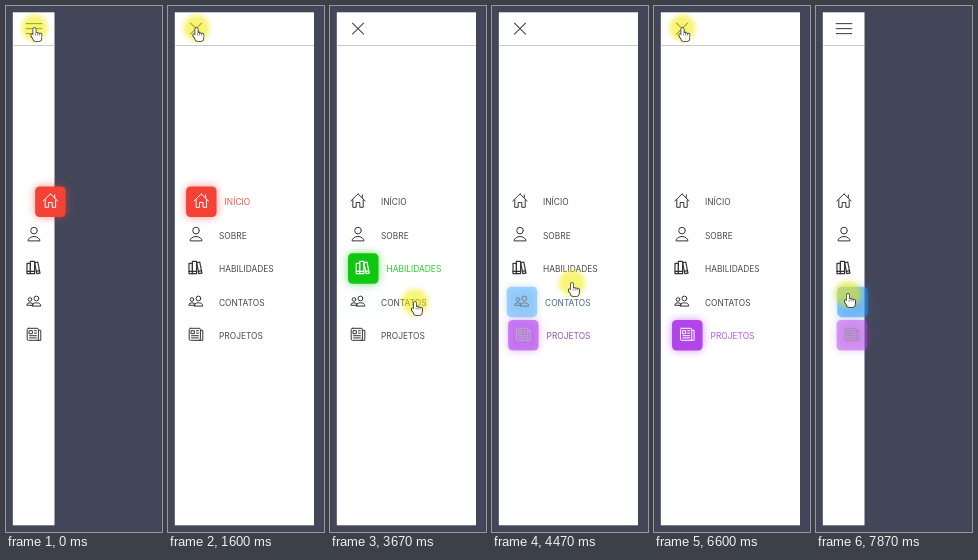
Write an HTML page with a canvas that moves like this. It is 156x526 px and loops after 8 s.

```html
<!DOCTYPE html>
<html lang="pt">
<head>
<meta charset="utf-8">
<title>Menu lateral</title>
<style>
  html, body { margin: 0; width: 100%; height: 100%; overflow: hidden; background: #434559; }
  canvas { display: block; width: 156px; height: 526px; }
</style>
</head>
<body>
<canvas id="stage"></canvas>
<script>
const W = 156, H = 526, LOOP = 8000, STEP = 1000 / 15, TRANSITION = 500;
const canvas = document.getElementById('stage');
const ctx = canvas.getContext('2d');
const scale = window.devicePixelRatio || 1;
canvas.width = W * scale;
canvas.height = H * scale;

const OPEN_AT = 860, CLOSE_AT = 6650;
const BOX = 30.5;
const INK = [52, 52, 56], WHITE = [255, 255, 255];

const items = [
  { label: 'INÍCIO', color: [244, 67, 54], icon: home },
  { label: 'SOBRE', color: [255, 161, 23], icon: person },
  { label: 'HABILIDADES', color: [15, 199, 15], icon: books },
  { label: 'CONTATOS', color: [33, 150, 243], icon: people },
  { label: 'PROJETOS', color: [177, 69, 233], icon: newspaper }
];

const rowY = i => 195.7 + 33.4 * i;
const clickTime = i => 2405 + 626 * (i - 1);

// Each item is clicked in turn, then one more click after the menu has closed.
const clicks = items.map((_, item) => ({ item, time: item ? clickTime(item) : -TRANSITION }));
clicks.push({ item: 3, time: 7715 });

const menuButton = { x: 28.5, y: 22 };
const glide = (start, duration, x, y) => ({ start, duration, x, y });
const glides = [
  glide(1700, 660, 81, rowY(1)),
  ...[2, 3, 4].map(i => glide(clickTime(i - 1), 300, 85, rowY(i))),
  glide(clickTime(4), 180, 80, 277),
  glide(4700, 700, 81.5, 297),
  glide(5870, 480, menuButton.x, menuButton.y),
  glide(CLOSE_AT, 400, 86, 173),
  glide(7070, 270, 106, 222),
  glide(7340, 300, 32, 288)
];

const mix = (a, b, k) => a + (b - a) * k;
const mixColor = (a, b, k) => a.map((v, i) => mix(v, b[i], k));
const rgba = (c, alpha = 1) => `rgba(${c.map(Math.round).join()},${alpha})`;
const clamp = v => Math.min(1, Math.max(0, v));
const smooth = k => k * k * (3 - 2 * k);

// The CSS "ease" curve, solved by bisection.
function ease(x) {
  x = clamp(x);
  const bezier = (a, b, s) => 3 * a * s * (1 - s) ** 2 + 3 * b * s * s * (1 - s) + s ** 3;
  let lo = 0, hi = 1;
  for (let i = 0; i < 20; i++) {
    const mid = (lo + hi) / 2;
    if (bezier(.25, .25, mid) < x) lo = mid; else hi = mid;
  }
  return bezier(.1, 1, lo);
}

const since = (start, t) => ease((t - start) / TRANSITION);
const openness = t => since(OPEN_AT, t) - since(CLOSE_AT, t);

function activity(index, t) {
  const last = clicks.findLastIndex(c => c.time <= t);
  const k = since(clicks[last].time, t);
  if (clicks[last].item === index) return k;
  return clicks[last - 1]?.item === index ? 1 - k : 0;
}

function pointerAt(t) {
  return glides.reduce((p, g) => {
    const k = smooth(clamp((t - g.start) / g.duration));
    return { x: mix(p.x, g.x, k), y: mix(p.y, g.y, k) };
  }, menuButton);
}

function line(...points) {
  ctx.beginPath();
  for (let i = 0; i < points.length; i += 2) ctx.lineTo(points[i], points[i + 1]);
  ctx.stroke();
}

function roundBox(x, y, w, h, r) {
  ctx.beginPath();
  ctx.roundRect(x, y, w, h, r);
}

function at(x, y, turn, drawPart) {
  ctx.save();
  ctx.translate(x, y);
  ctx.rotate(turn);
  drawPart();
  ctx.restore();
}

// Head and shoulders; r is the head radius.
function bust(r) {
  ctx.beginPath();
  ctx.arc(0, -r, r, 0, Math.PI * 2);
  ctx.stroke();
  ctx.beginPath();
  ctx.ellipse(0, 2 * r, 1.8 * r, 1.2 * r, 0, Math.PI, 0);
  ctx.closePath();
  ctx.stroke();
}

function home() {
  for (const side of [-1, 1]) {
    line(0, -6.8, side * 7.2, .3);
    line(side * 5.2, -1, side * 5.2, 6.6, side * 1.8, 6.6, side * 1.8, 1.8, 0, 1.8);
  }
  line(4.3, -3, 4.3, -5.8);
}

function person() {
  at(0, -.2, 0, () => bust(3.3));
}

function books() {
  const book = (x, w, h) => {
    ctx.strokeRect(x, 6.2 - h, w, h);
    line(x, 3.8, x + w, 3.8);
  };
  ctx.lineWidth = 1.2;
  book(-7, 3.4, 10.4);
  book(-3.6, 4.2, 12.4);
  at(2.2, 0, -.2, () => book(-.6, 3.2, 11.2));
}

function people() {
  at(2.4, 0, 0, () => bust(2.4));
  at(-4, .4, 0, () => bust(1.8));
}

function newspaper() {
  roundBox(-6.8, -6, 11.2, 12, 1.2);
  ctx.stroke();
  line(4.4, -4, 6.8, -4, 6.8, 6, 3.4, 6);
  ctx.strokeRect(-4.6, -3.6, 3, 3);
  for (const y of [-3.6, -1.2, 1.4, 3.6]) line(y < 0 ? .2 : -4.6, y, 2.4, y);
}

function drawToggle(open) {
  ctx.strokeStyle = '#4a4a4e';
  ctx.lineWidth = 1.1;
  for (const side of [-1, 0, 1]) {
    at(28, 22.6 + side * 5 * (1 - open), -side * open * Math.PI / 4, () => {
      ctx.globalAlpha = side ? 1 : 1 - open;
      line(-8.2, 0, 8.2, 0);
    });
  }
}

function drawItem(item, index, t, open, width) {
  const active = activity(index, t);
  const y = rowY(index);
  const centre = 28 + active * mix(16.4, 5.3, open);

  if (active > 0) {
    ctx.save();
    ctx.globalAlpha = active;
    ctx.fillStyle = rgba(item.color);
    ctx.shadowColor = rgba(item.color, .6);
    ctx.shadowBlur = 9 * scale;
    roundBox(centre - BOX / 2, y - BOX / 2, BOX, BOX, 4.5);
    ctx.fill();
    ctx.restore();
  }

  at(centre, y - 1, 0, () => {
    ctx.strokeStyle = rgba(mixColor(INK, WHITE, active));
    ctx.lineWidth = 1;
    ctx.lineJoin = ctx.lineCap = 'round';
    item.icon();
  });

  ctx.save();
  ctx.beginPath();
  ctx.rect(7, 6, width, 513);
  ctx.clip();
  ctx.globalAlpha = open * .9;
  ctx.fillStyle = rgba(mixColor(INK, item.color, active));
  ctx.font = '400 8.4px Inter, sans-serif';
  ctx.fillText(item.label, 51 + 5.6 * active, y + 3.6);
  ctx.restore();
}

// Stroking every part before filling leaves one joined outline.
function hand() {
  const parts = [() => roundBox(-1.2, 6, 8, 7, 2.5), () => roundBox(-1.2, 0, 2.4, 9, 1.2)];
  for (let i = 1; i < 4; i++) parts.push(() => roundBox(2 * i - 1, 4.4 + i * .4, 2, 4, 1));
  parts.push(() => {
    ctx.beginPath();
    ctx.ellipse(-1.4, 8.6, 1.2, 2.8, -.6, 0, Math.PI * 2);
  });
  for (const paint of ['stroke', 'fill']) {
    for (const part of parts) {
      part();
      ctx[paint]();
    }
  }
  ctx.lineWidth = .5;
  for (let i = 0; i < 3; i++) line(1.1 + 2 * i, 5.5, 1.1 + 2 * i, 7.6);
}

function arrow() {
  const shape = new Path2D('M0 0V9L2 7.2L3.6 10.4L5 9.8L3.6 6.6H6.4Z');
  ctx.stroke(shape);
  ctx.fill(shape);
}

function drawPointer(t, width) {
  const { x, y } = pointerAt(t);
  const glow = ctx.createRadialGradient(x, y, 0, x, y, 16.5);
  glow.addColorStop(0, 'rgba(242,236,8,.6)');
  glow.addColorStop(.6, 'rgba(242,236,8,.52)');
  glow.addColorStop(1, 'rgba(242,236,8,0)');
  ctx.fillStyle = glow;
  ctx.fillRect(x - 17, y - 17, 34, 34);

  const clickable = x < 7 + width && (y < 40 || y > rowY(0) - BOX / 2);
  at(x, y, 0, () => {
    ctx.fillStyle = '#fff';
    ctx.strokeStyle = '#2a2a2a';
    ctx.lineWidth = 1.5;
    ctx.lineJoin = 'round';
    (clickable ? hand : arrow)();
  });
}

function draw(t) {
  const open = openness(t);
  const width = mix(41.5, 139, open);
  ctx.setTransform(scale, 0, 0, scale, 0, 0);
  ctx.fillStyle = '#434559';
  ctx.fillRect(0, 0, W, H);
  ctx.fillStyle = '#fff';
  ctx.fillRect(6.8, 6.3, width + .2, 513);
  ctx.fillStyle = '#cacacc';
  ctx.fillRect(6.8, 39, width + .2, 1);
  drawToggle(open);
  items.forEach((item, i) => drawItem(item, i, t, open, width));
  drawPointer(t, width);
}

// The picture advances at 15 steps per second and rests on the last pose.
function tick(now) {
  const step = Math.floor((now % LOOP + 4) / STEP);
  draw(Math.min(step, 118) * STEP);
  requestAnimationFrame(tick);
}
tick(performance.now());
</script>
</body>
</html>
```
